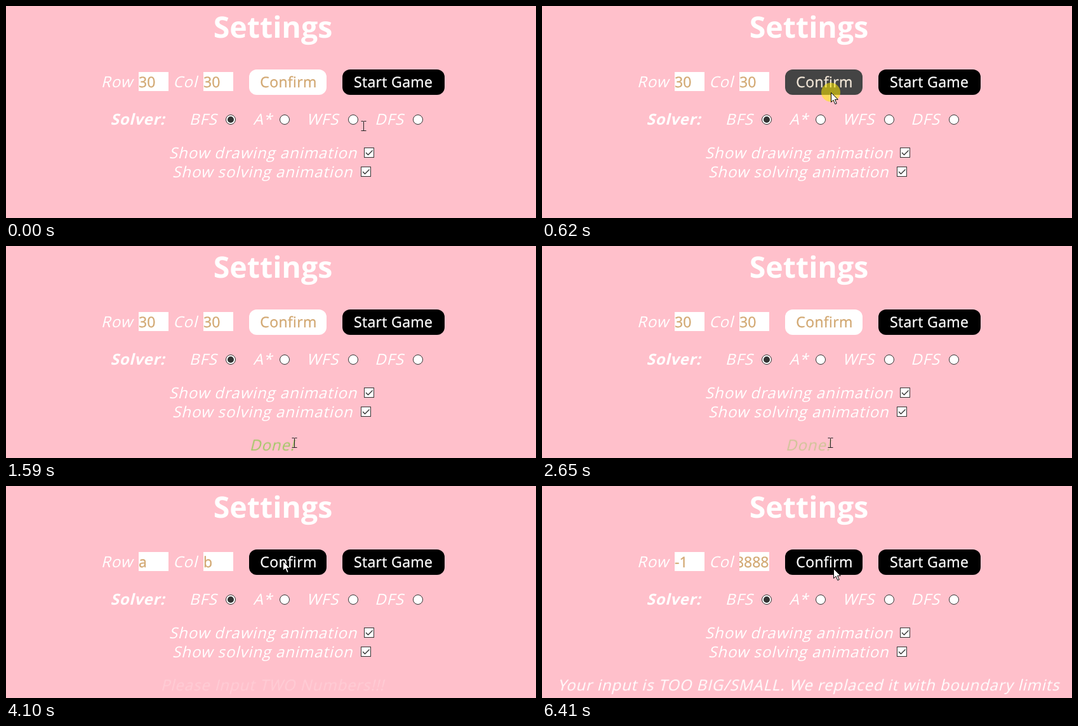
Write an HTML page that moves like this. It is 835x334 px and loops after 6.97 s.

```html
<!DOCTYPE html>
<html lang="en">
<head>
<meta charset="utf-8">
<title>Settings</title>
<style>
  html, body { margin: 0; width: 100%; height: 100%; overflow: hidden; background: #ffc0cb; }
  svg { display: block; }
  text { font: 23px "Open Sans", "Noto Sans", sans-serif; fill: #fff; white-space: pre; text-rendering: geometricPrecision; }
  .title { font-size: 46.5px; font-weight: 700; text-anchor: middle; }
  .label text { font-size: 24px; letter-spacing: .9px; }
  .label .bold { font-weight: 700; letter-spacing: .7px; }
  .button, .field text { fill: currentColor; stroke: currentColor; stroke-width: .35px; }
  .button { color: #fff; letter-spacing: .35px; }
  .field text { color: #d2a872; }
  .end { text-anchor: end; }
  .box { fill: #fff; stroke: #333; }
  .tick { fill: none; stroke: #333; stroke-width: 1.4; }
  #done text { fill: #a0c864; }
  #done, #notNumbers, #outOfRange, #spot, .second, .third { opacity: 0; }
</style>
</head>
<body>
<svg width="835" height="334" viewBox="0 0 835 334">
  <text class="title" x="420.5" y="50">Settings</text>

  <g class="label">
    <text transform="translate(149.7 128) skewX(-14)">Row</text>
    <text transform="translate(263.2 128) skewX(-14)">Col</text>
    <text class="bold" transform="translate(164.5 187) skewX(-14)">Solver:</text>
    <text transform="translate(288.7 187) skewX(-14)">BFS</text>
    <text transform="translate(389.5 187) skewX(-14)">A*</text>
    <text transform="translate(473.5 187) skewX(-14)">WFS</text>
    <text transform="translate(581 187) skewX(-14)">DFS</text>
    <text transform="translate(256.8 239.5) skewX(-14)">Show drawing animation</text>
    <text transform="translate(262 269.5) skewX(-14)">Show solving animation</text>
    <g id="done"><text transform="translate(383.8 322) skewX(-14)">Done!</text></g>
    <g id="notNumbers"><text transform="translate(243.8 322) skewX(-14)">Please Input TWO Numbers!!!</text></g>
    <g id="outOfRange"><text transform="translate(24.6 322) skewX(-14)">Your input is TOO BIG/SMALL. We replaced it with boundary limits</text></g>
  </g>

  <svg class="field" x="209" y="104" width="47" height="30">
    <rect width="47" height="30" fill="#fff"/>
    <text class="first" y="24">30</text>
    <text class="second" y="24">a</text>
    <text class="third" y="24">-1</text>
  </svg>
  <svg class="field" x="311" y="104" width="47" height="30">
    <rect width="47" height="30" fill="#fff"/>
    <text class="first" y="24">30</text>
    <text class="second" y="24">b</text>
    <text class="third end" x="46.5" y="24">8888</text>
  </svg>

  <rect id="confirm" x="383" y="100" width="122" height="40" rx="12" fill="#fff"/>
  <text id="confirmText" class="button" x="400.3" y="128">Confirm</text>
  <rect x="530" y="100" width="161" height="40" rx="12"/>
  <text class="button" x="548" y="128">Start Game</text>

  <g class="box">
    <circle cx="354" cy="179" r="7.5"/>
    <circle cx="439" cy="179" r="7.5"/>
    <circle cx="547" cy="179" r="7.5"/>
    <circle cx="649" cy="179" r="7.5"/>
    <rect x="564.5" y="223.5" width="15" height="15"/>
    <rect x="559.5" y="253.5" width="15" height="15"/>
  </g>
  <circle cx="354" cy="179" r="5" fill="#333"/>
  <path class="tick" d="M567 231l3.5 3.5 7-7M562 261l3.5 3.5 7-7"/>

  <g id="pointer">
    <circle id="spot" r="15" fill="#ffeb00" fill-opacity=".55"/>
    <path id="arrow" d="M.5.5V15.5L4 12.2 6.8 18.5 9.2 17.5 6.5 11.3H11.3Z" fill="#fff" stroke="#000"/>
    <path id="beam" d="M-2.5-6.5H.5Q1.5-6.5 1.5-5.5Q1.5-6.5 2.5-6.5H5.5M1.5-6V8.5M-2.5 8.5H5.5" fill="none" stroke="#222"/>
  </g>
</svg>
<script>
  const LOOP = 6970;

  // Each key is [ms, value, easing to the next key]; without an easing the value holds.
  function track(selector, prop, ...keys) {
    const frames = keys.map(([ms, value, easing = 'steps(1, end)']) =>
      ({ offset: ms / LOOP, [prop]: value, easing }));
    frames.push({ offset: 1, [prop]: keys[keys.length - 1][1] });
    for (const el of document.querySelectorAll(selector))
      el.animate(frames, { duration: LOOP, iterations: Infinity });
  }

  const at = (x, y) => `translate(${x}px, ${y}px)`;

  track('#pointer', 'transform',
    [0, at(562, 188)], [30, at(557, 182), 'ease-in-out'], [590, at(455, 136)],
    [1590, at(453, 309)], [3240, at(436, 118)],
    [4940, at(463, 133)], [5290, at(462, 132), 'linear'], [5380, at(459, 130)]);
  track('#arrow', 'opacity', [0, 0], [30, 1], [1590, 0], [2960, 1]);
  track('#beam', 'opacity', [0, 1], [30, 0], [1590, 1], [2960, 0]);
  track('#spot', 'opacity',
    [0, 0], [580, 1], [820, 0], [2220, 1], [2370, 0],
    [3740, 1], [3870, 0], [5660, 1], [5800, 0]);

  track('#confirm', 'fill',
    [0, '#fff'], [490, '#fff', 'ease'], [790, '#000'], [1590, '#fff'], [3240, '#000']);
  track('#confirmText', 'color',
    [0, '#d2a872'], [490, '#d2a872', 'ease'], [790, '#fff'], [1590, '#d2a872'], [3240, '#fff']);

  track('.first', 'opacity', [0, 1], [3240, 0]);
  track('.second', 'opacity', [0, 0], [3240, 1], [4940, 0]);
  track('.third', 'opacity', [0, 0], [4940, 1]);

  track('#done', 'opacity',
    [0, 0], [1050, .15], [1180, .4], [1360, .75], [1590, 1], [2370, 1, 'linear'], [2960, 0]);
  track('#notNumbers', 'opacity',
    [0, 0], [4100, .2], [4250, .45, 'linear'], [4480, 1], [5850, 0]);
  track('#outOfRange', 'opacity',
    [0, 0], [6030, .2, 'linear'], [6410, 1]);
</script>
</body>
</html>
```
